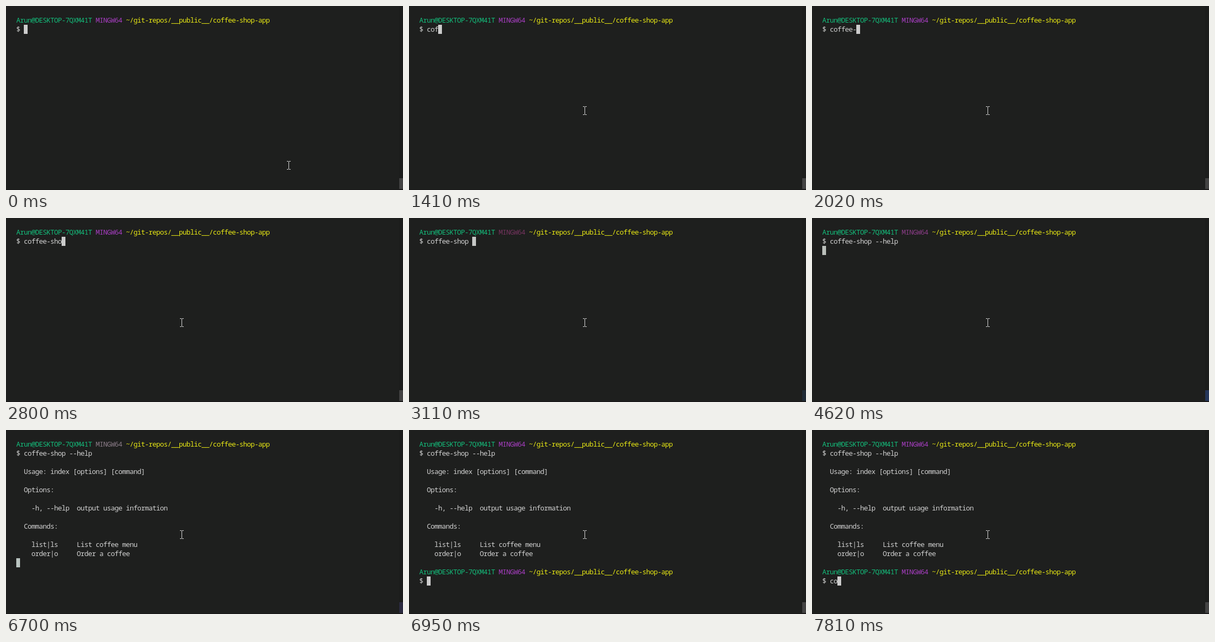
Animation of 735x343 px, one loop 8000 ms. Source, as an HTML page with a canvas:

```html
<!DOCTYPE html>
<html lang="en">
<head>
<meta charset="utf-8">
<title>Coffee shop CLI</title>
<style>
  html, body { margin: 0; width: 100%; height: 100%; overflow: hidden; background: #1e1f1e; }
  canvas { display: block; }
</style>
</head>
<body>
<canvas id="stage" width="735" height="343"></canvas>
<script>
const ctx = document.getElementById('stage').getContext('2d');
const LOOP = 8000;
const CELL = 7, LINE = 17, LEFT = 19, TOP = 18, BASE = 13;
const TEXT = '#d2d2d2', GREEN = '#14bd7b', YELLOW = '#e9e914';

const COMMAND = 'coffee-shop --help';
const KEYS = [860, 1010, 1410, 1480, 1640, 1790, 2020, 2250, 2480,
  2800, 2950, 3110, 3350, 3500, 3900, 4060, 4210, 4380];
const NEXT_KEYS = [7720, 7810];
const ENTER = 4620, OUTPUT = 6700, PROMPT = 6950;

const HELP = [
  '',
  '  Usage: index [options] [command]',
  '',
  '  Options:',
  '',
  '    -h, --help  output usage information',
  '',
  '  Commands:',
  '',
  '    list|ls     List coffee menu',
  '    order|o     Order a coffee'
];

// time, then the tints of the shell name, scroll thumb and text cursor
const TINTS = [
  [0, '#a83ec2', '#434343', '#cccccc'],
  [2950, '#75345f', '#1f2a36', '#c6c8c6'],
  [4060, '#8c3d88', '#25365a', '#babfba'],
  [OUTPUT, '#8b7c88', '#2b2a40', '#b9c4c0'],
  [PROMPT, '#a83ec2', '#434343', '#cccccc']
];

// time, x, y
const POINTER = [[0, 523, 297], [70, 448, 258], [150, 364, 215], [230, 325, 195]];

const latest = (steps, t) => steps.filter(s => s[0] <= t).pop();
const typed = (keys, t) => COMMAND.slice(0, keys.filter(k => k <= t).length);

function box(x, y, w, h, color) {
  ctx.fillStyle = color;
  ctx.fillRect(x, y, w, h);
}

// Glyphs are a little wider than the cell, as in a terminal that rounds its grid down.
function write(text, col, row, color) {
  ctx.fillStyle = color;
  [...text].forEach((ch, i) => {
    ctx.fillText(ch, LEFT + (col + i) * CELL, TOP + row * LINE + BASE);
  });
}

function prompt(row, input, magenta) {
  write('Arun@DESKTOP-7QXM41T', 0, row, GREEN);
  write('MINGW64', 21, row, magenta);
  write('~/git-repos/__public__/coffee-shop-app', 29, row, YELLOW);
  write('$ ' + input, 0, row + 1, TEXT);
}

function pointer(x, y) {
  const c = '#d8d8d8';
  for (const edge of [y - 8, y + 7]) {
    box(x - 3, edge, 3, 1, c);
    box(x + 1, edge, 3, 1, c);
  }
  box(x, y - 7, 1, 14, c);
}

function draw(t) {
  const [, magenta, thumb, block] = latest(TINTS, t);
  const input = typed(KEYS, t);
  let col = 2 + input.length, row = 1;

  box(0, 0, 735, 343, '#1e1f1e');
  box(728, 0, 7, 341, '#1c1d1c');
  box(728, 321, 7, 20, thumb);
  box(0, 342, 735, 1, '#191718');

  ctx.font = '500 12.8px "Noto Sans Mono", "DejaVu Sans Mono", monospace';
  prompt(0, input, magenta);
  if (t >= ENTER) [col, row] = [0, 2];
  if (t >= OUTPUT) {
    HELP.forEach((line, i) => write(line, 0, 2 + i, TEXT));
    row = 13;
  }
  if (t >= PROMPT) {
    const next = typed(NEXT_KEYS, t);
    prompt(14, next, magenta);
    [col, row] = [2 + next.length, 15];
  }
  box(LEFT + col * CELL, TOP + row * LINE, CELL, LINE, block);

  const [, x, y] = latest(POINTER, t);
  pointer(x, y);
}

const start = performance.now();
function tick() {
  draw((performance.now() - start) % LOOP);
  requestAnimationFrame(tick);
}
tick();
</script>
</body>
</html>
```
